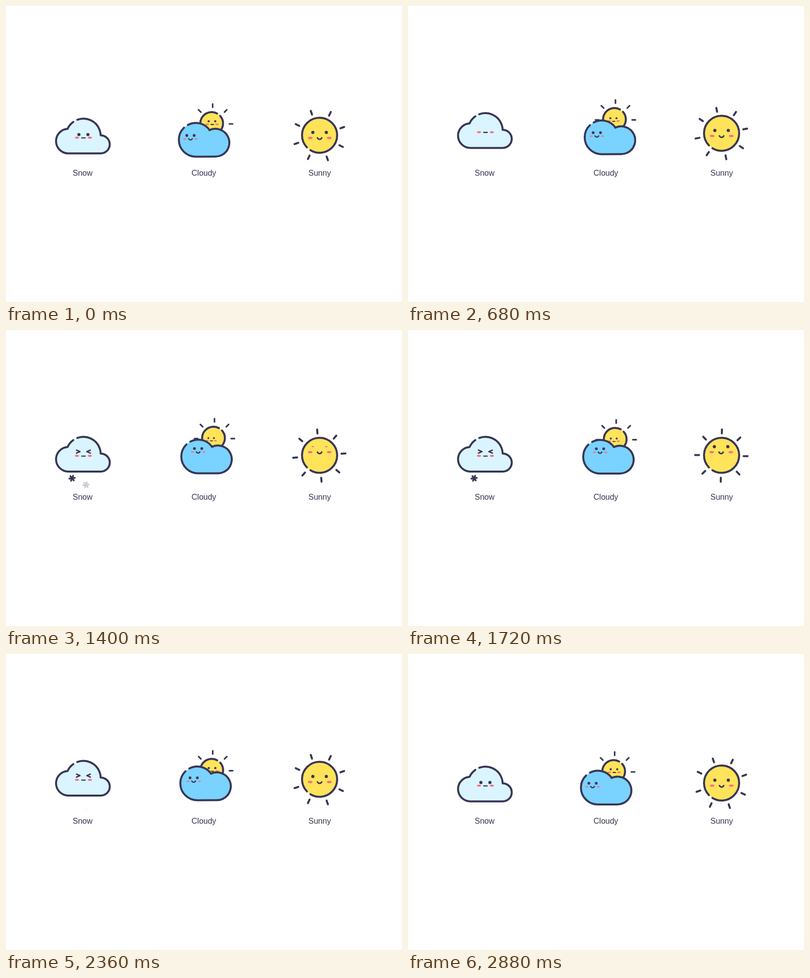
These frames come from a looping animation (800 by 600 pixels, 2.92 s). An HTML page with a canvas:

```html
<!DOCTYPE html>
<html lang="en">
<head>
<meta charset="utf-8">
<title>Weather icons</title>
<style>
  html, body { margin: 0; width: 100%; height: 100%; overflow: hidden; background: #fff; }
  canvas { display: block; width: 800px; height: 600px; }
</style>
</head>
<body>
<canvas id="stage" width="800" height="600"></canvas>
<script>
const LOOP = 2920, STEP = 40;
const INK = '#383655', PINK = '#ff6f7e', YELLOW = '#ffe35a', BLUE = '#7ad2ff', ICE = '#daf5ff';
const ctx = document.getElementById('stage').getContext('2d');

// Timing helpers, all times in ms.
const part = (t, from, to) => Math.min(1, Math.max(0, (t - from) / (to - from)));
const ease = (t, from, to) => (1 - Math.cos(Math.PI * part(t, from, to))) / 2;
const pulse = (t, a, b, c, d) => ease(t, a, b) - ease(t, c, d);
const fall = (t, from, to) => 1 - part(t, from, to) ** 2;
const rad = deg => deg * Math.PI / 180;

function at(x, y, draw) {
  ctx.save();
  ctx.translate(x, y);
  draw();
  ctx.restore();
}

function stroke(width) {
  ctx.strokeStyle = INK;
  ctx.lineWidth = width;
  ctx.stroke();
}

function line(width, ...points) {
  ctx.beginPath();
  points.forEach(([x, y]) => ctx.lineTo(x, y));
  stroke(width);
}

function oval(x, y, rx, ry, color) {
  ctx.beginPath();
  ctx.ellipse(x, y, rx, ry, 0, 0, 2 * Math.PI);
  ctx.fillStyle = color;
  ctx.fill();
}

// Each arc is [x, y, radius, from, to]; the outline starts and ends at the gap.
function outline(color, ...arcs) {
  ctx.beginPath();
  arcs.forEach(([x, y, r, a, b]) => ctx.arc(x, y, r, rad(a), rad(b)));
  ctx.fillStyle = color;
  ctx.fill();
  stroke(4);
}

function pair(x, y, gap, rx, ry, color) {
  oval(x - gap, y, rx, ry, color);
  oval(x + gap, y, rx, ry, color);
}

function smile(x, y, r, width) {
  ctx.beginPath();
  ctx.arc(x, y, r, rad(22), rad(158));
  stroke(width);
}

function spokes(count, gap, turn, inner, outer, width) {
  for (let i = 0; i < count; i++) {
    const a = rad(turn + i * gap), c = Math.cos(a), s = Math.sin(a);
    line(width, [c * inner, s * inner], [c * outer, s * outer]);
  }
}

function flake(x, y, alpha) {
  ctx.beginPath();
  for (let i = 0; i < 6; i++) {
    const a = rad(i * 60 - 8);
    ctx.moveTo(x, y);
    ctx.lineTo(x + 5.6 * Math.cos(a), y + 5.6 * Math.sin(a));
  }
  ctx.globalAlpha = alpha;
  stroke(3.5);
  ctx.globalAlpha = 1;
}

function drawSnow(t) {
  const blink = s => pulse(s, 1120, 1200, 1240, 1480);
  const open = 1 - pulse(t, 560, 680, 2560, 2680);
  const squint = pulse(t, 680, 800, 2440, 2560);
  const shake = 3.6 * Math.sin(6 * Math.PI * part(t, 760, 1336));

  flake(133.5, 300.5, pulse(t, 1160, 1360, 1760, 1960));
  flake(161.5, 314, blink(t) + blink(t - 900));
  at(0, 0.3 - 11.8 * pulse(t, 0, 800, 2400, 2900), () => {
    outline(ICE,
      [156.3, 263, 35, 249.3, 358],
      [191.3, 280.2, 18.3, -90, 90],
      [126, 273.6, 24.9, 90, 266],
      [156.3, 263, 35, 204, 234.5]);
    at(156.4 + shake, 0, () => {
      pair(0, 260.3, 9.1, 3.2, 3.2 * open, INK);
      if (squint > 0) for (const side of [-1, 1]) at(0, 258.1, () => {
        ctx.scale(side, squint);
        line(2.7, [14, -3], [7, 0], [14, 3]);
      });
      pair(0, 266.6, 13, 4.1, 2.1, PINK);
      line(2.3, [-3.5, 267.1], [3.8, 267.1]);
    });
  });
}

function drawCloudy(t) {
  const lift = 19 * pulse(t, 40, 1440, 1440, 2640);
  const drift = 3.7 * pulse(t, 40, 1440, 1440, 2480);
  const peek = pulse(t, 360, 1000, 1400, 2200);
  const look = pulse(t, 600, 1000, 1800, 2720);
  const settle = fall(t, 1450, 2900);

  at(415.5 + drift, 238 - lift, () => {
    at(2, 1, () => spokes(5, 45, 180, 33.7, 40.4, 3.2));
    outline(YELLOW, [0, 0, 23, -42, 299]);
    at(0.6 - 5.4 * peek, -4.4 + 4.4 * peek, () => {
      ctx.scale(1 - 0.15 * peek, 1 - 0.15 * peek);
      pair(0, 0, 6.6, 2.2, 2.2, INK);
      pair(0.4, 6.2, 9.7, 3.5, 1.6, PINK);
      line(2.2, [-1.8, 6.6], [3.2, 6.6]);
    });
  });

  const x = settle * (7.8 * ease(t, 0, 620) - 2.9 * ease(t, 640, 1440));
  const y = settle * -14.8 * ease(t, 190, 1430);
  at(x, y, () => {
    outline(BLUE,
      [383.4, 271.2, 34.2, 242, 324.5],
      [423, 277.1, 28.2, 244.5, 450],
      [383.4, 271.2, 34.2, 90, 226]);
    at(372.7 + 10.5 * look, -7.3 * look, () => {
      pair(0, 262.4, 7.4, 2.8, 2.8, INK);
      pair(0, 269.5, 11.5, 3.2, 1.4, PINK);
      smile(0, 267.4, 4, 2.5);
    });
  });
}

function drawSunny(t) {
  const turn = 225 * part(t, 0, 1865) ** 1.43;
  const lift = 8 * ease(t, 0, 1360) * fall(t, 2360, 2900);
  const lookUp = 11.8 * pulse(t, 1000, 1360, 1740, 2300);
  const lookLeft = pulse(t, 1440, 1720, 1760, 2300);
  const open = 1 - 0.88 * pulse(t, 1280, 1400, 1400, 1520);

  at(633.5, 262 - lift, () => {
    at(-0.5, 0.6, () => spokes(8, 45, turn - 19.1, 45, 53, 4));
    outline(YELLOW, [0, 0, 35.5, 136, 481.5]);
    at(-lookLeft, -lookUp, () => {
      pair(0, -5.7, 13.6, 3.2, 3.2 * open, INK);
      pair(0.3, 5.4, 19.3, 4.6, 2.3, PINK);
      smile(0, 3.5, 4.7, 3);
    });
  });
}

function label(text, x) {
  ctx.font = '16px "Liberation Sans", Arial, sans-serif';
  ctx.textAlign = 'center';
  ctx.fillStyle = '#38304f';
  ctx.fillText(text, x, 344);
}

function frame(now) {
  const t = Math.floor((now % LOOP) / STEP) * STEP;
  ctx.fillStyle = '#fff';
  ctx.fillRect(0, 0, 800, 600);
  ctx.lineCap = ctx.lineJoin = 'round';
  drawSnow(t);
  drawCloudy(t);
  drawSunny(t);
  label('Snow', 154.8);
  label('Cloudy', 399.7);
  label('Sunny', 633.7);
}

const start = performance.now();
function tick() {
  frame(performance.now() - start);
  requestAnimationFrame(tick);
}
tick();
</script>
</body>
</html>
```
